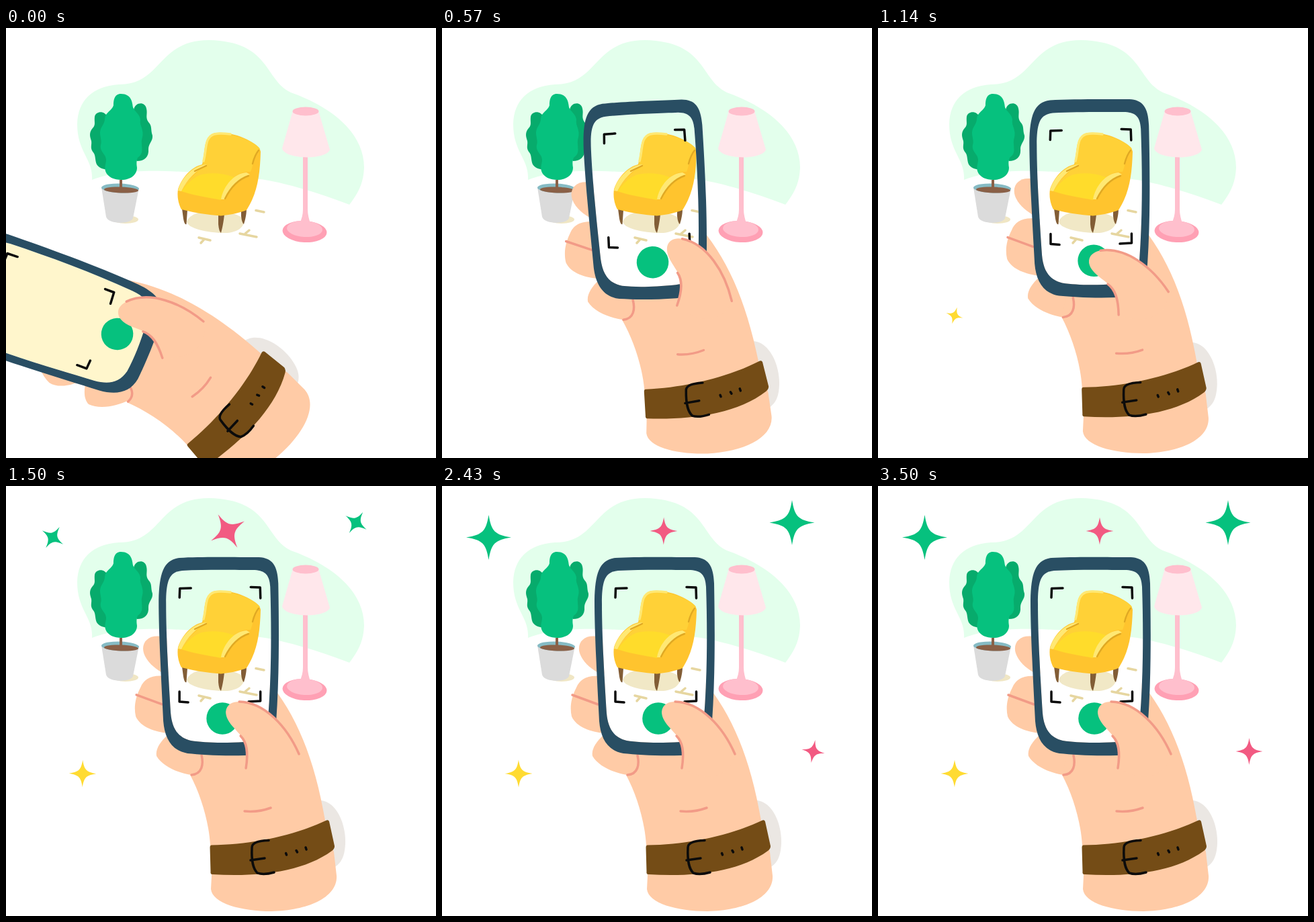
An HTML page that plays this animation: 640x640 px, repeating every 3.57 s.

```html
<!DOCTYPE html>
<html lang="en">
<head>
<meta charset="utf-8">
<title>Phone camera</title>
<style>
  html, body { margin: 0; width: 100%; height: 100%; overflow: hidden; background: #fff; }
  svg { display: block; width: 100vw; height: 100vh; }
  .line { fill: none; stroke-linecap: round; stroke-linejoin: round; stroke-width: 3.5; }
  .crease { stroke: #f29b87; }
  .ink { stroke: #0b0b0b; }
  .mark { stroke: #e6d6a0; }
  .fold { stroke: #e0a923; stroke-width: 2.4; }
  .glow { stroke: #ffe873; }
  .skin { fill: #ffcba6; }
  .wood { fill: #825d36; }
  .leaf { fill: #06c17e; }
  .shade { fill: #07ab6c; }
</style>
</head>
<body>
<svg viewBox="0 0 640 640">
  <defs>
    <clipPath id="glass">
      <path id="hole" d="M262 126C300 124 345 125 370 125C386 126 392 133 393 150C395 210 395 280 390 345C388 370 378 380 355 381C320 383 295 382 275 379C255 374 247 360 245 338C242 290 238 225 238 175C238 140 243 128 262 126Z"/>
    </clipPath>
    <path id="spark" d="M0-1C.12-.27 .27-.12 1 0C.27 .12 .12 .27 0 1C-.12 .27-.27 .12-1 0C-.27-.12-.12-.27 0-1Z"/>
  </defs>

  <path id="wall" fill="#e3ffec" d="M128 226C130 195 106 185 106 143C107 108 128 87 168 84C232 85 225 18 302 18C394 20 384 77 424 96C470 112 533 148 533 208C532 232 524 246 511 263C460 243 405 228 378 225C310 215 240 212 205 213C170 214 145 219 128 226Z"/>

  <g id="plant">
    <ellipse cx="178" cy="285" rx="19" ry="6" fill="#f0e6c4"/>
    <path class="shade" d="M151 133C148 123 134 123 132 132C131 140 134 144 129 149C123 156 125 162 127 168C128 174 125 178 129 184C134 189 132 196 135 203C139 209 146 211 152 210L166 180Z"/>
    <path class="shade" d="M190 122C192 110 207 109 209 120C211 128 207 133 212 140C218 146 215 152 218 160C219 168 212 172 212 180C213 192 206 198 195 198L176 170Z"/>
    <path class="leaf" d="M171 98C161 98 160 108 160 115C158 123 148 125 147 135C147 144 140 147 140 156C140 163 143 168 141 174C139 184 149 188 149 196C149 202 146 206 148 213C151 222 161 226 172 226C186 226 195 218 195 208C194 202 194 198 196 193C205 187 202 180 202 172C201 165 205 161 203 153C202 146 199 144 200 137C200 129 191 124 189 118C188 111 187 98 171 98Z"/>
    <path fill="#dbdbdb" d="M142 237L149 281C152 292 185 293 189 283L198 238Z"/>
    <ellipse cx="170" cy="238.500" rx="28" ry="7" fill="#86bbc4" transform="rotate(2 170 238)"/>
    <ellipse cx="171.500" cy="241" rx="25.500" ry="4.500" fill="#8a6047" transform="rotate(2 171 241)"/>
    <path fill="#8a6047" d="M169 226h4v14h-4z"/>
  </g>

  <g id="lamp">
    <ellipse cx="444.500" cy="303" rx="33" ry="16" fill="#ffa0b4" transform="rotate(3 444 303)"/>
    <ellipse cx="444.500" cy="299" rx="26.500" ry="12" fill="#ffbfcd" transform="rotate(3 444 299)"/>
    <path fill="#ffbfcd" d="M442 185h7V270C449 278 451 284 453 291H437C440 284 442 278 442 270Z"/>
    <path fill="#ffe7eb" d="M427 123L411 179C414 196 477 197 482 181L465 123Z"/>
    <ellipse cx="446" cy="124" rx="19.500" ry="6.500" fill="#ffbfcd"/>
  </g>

  <g id="chair">
    <path fill="#f1e8c6" d="M269 288C270 298 298 305 326 305C343 305 354 297 354 288C354 272 280 262 269 288Z"/>
    <path class="line mark" d="M372 271.500L384 274M348 306L373 311M356 306L362 301M287 312L304 316M290 320L294.500 315"/>
    <path class="wood" d="M262 269L270 271L268.500 292Q266 294 264 284ZM316 277L325 277C324 288 322 298 320 305Q317 303 316 292ZM350 271L358 269C358 277 356 286 354 292Q351 290 350 280Z"/>
    <path fill="#ffc42e" d="M256 240C254 254 258 264 261 270Q292 278 320 279.500C335 278 348 275 358 271C374 246 378 220 379 184C378 172 338 152 310 156.500C293 162 297 185 292 203C276 207 262 222 256 240Z"/>
    <path fill="#ffd137" d="M293 203C298 180 294 163 312 157.500C340 155 375 172 378 180C366 192 369 204 364 214C346 213 335 224 330 236L282 218Z"/>
    <path fill="#ffdc2b" d="M261 243C273 226 285 217 298 217C312 215 330 218 341 223C328 234 322 245 320 256C300 252 278 249 261 243Z"/>
    <path fill="#ffd137" d="M261 242C272 222 285 215 298 204L299 216C284 217 272 229 261 242Z"/>
    <path class="line glow" d="M294 198C299 180 295 163 310 158C318 156 326 157 334 158"/>
    <path fill="#ffe873" d="M256 242C261 222 280 204 299 203C284 212 270 224 261 243ZM320 255C324 234 340 216 358 215L363 218C347 223 334 238 326 255Z"/>
    <path class="line fold" d="M281 213L298 205M326 254C334 238 346 225 361 220M367 202C369 194 372 187 376 182"/>
  </g>

  <g id="fingers">
    <path class="skin" d="M255 229L230 224C212 221 200 233 205 249C210 263 222 272 234 279L260 280Z"/>
    <path class="skin" d="M260 285L236 283C215 281 205 288 200 300C192 315 190 330 193 343C200 359 222 366 241 368L265 362Z"/>
    <path class="skin" d="M290 375L241 370C229 381 222 392 224 402C234 419 260 428 276 430L300 425Z"/>
    <path class="line crease" d="M194 311L232 325"/>
  </g>

  <g id="arm">
    <path fill="#ebe7e3" d="M463 468C489 465 506 500 505 532C504 553 498 562 488 568Z"/>
    <path class="skin" d="M285 380L340 300L389 289C432 340 459 405 475 498L488 545L492 580C494 612 450 632 395 633C350 633 307 621 305 600L306 580L304 535C302 500 290 460 274 430Z"/>
    <path class="line crease" d="M291 401C294 414 292 429 276 430M355 484Q375 486 394 479"/>
    <path fill="#744c16" d="M306 534.500C365 534 430 520 477 497.500Q480 496.500 481 499.500L489 536Q489 540 485 543C440 576 370 582 307 578Q304 578 304.500 574L303.500 538Q303.500 534.500 306 534.500Z"/>
    <path class="line ink" d="M391 527.500C375 528 366 531 366 538C365 560 368 570 374 576C382 579 392 577 399 575M364 557L385 554"/>
    <path class="line ink" d="M416.500 546.500L417.500 549M432 542.500L433.500 545M446 538L447 541"/>
  </g>

  <g clip-path="url(#glass)">
    <path fill="#fff" d="M0 0H640V640H0Z"/>
    <use href="#wall"/>
    <use href="#chair"/>
    <path id="tint" fill="#fff6cc" d="M-400 0H640V640H-400Z"/>
  </g>

  <g id="phone">
    <path fill="#294e63" fill-rule="evenodd" d="M258 107C290 105 345 106 376 106C396 107 404 118 405 145C406 200 407 280 402 350C399 386 385 400 355 401C320 402 290 400 270 398C246 394 236 375 234 350C231 290 227 220 227 170C228 130 234 110 258 107ZM262 126C243 128 238 140 238 175C238 225 242 290 245 338C247 360 255 374 275 379C295 382 320 383 355 381C378 380 388 370 390 345C395 280 395 210 393 150C392 133 386 126 370 125C345 125 300 124 262 126Z"/>
    <path class="line ink" d="M258 166L258.500 152.500L275 152M364 150.500L378 151L378.500 167M258 306V321L271 322M361 321L378.500 320V306"/>
    <circle class="leaf" cx="322" cy="346" r="23.800"/>
  </g>

  <g id="thumb">
    <path class="skin" d="M347 321C385 322 418 358 436 399C430 432 396 444 357 420C361 396 358 381 349 371C340 360 327 350 327 336C328 325 337 321 347 321Z"/>
    <path class="line crease" d="M347 321C385 322 418 358 436 399M349 372C358 381 361 395 357 420"/>
  </g>

  <g id="stars"></g>
</svg>

<script>
const LOOP = 3570;
const $ = id => document.getElementById(id);

// x, y, radius, colour, landing time, spin per unit of scale
const stars = [
  [114, 428, 20.5, '#ffdb32', 1215, 45],
  [330, 67, 20.5, '#f25a82', 1350, 75],
  [69.5, 76.5, 33.5, '#06c17e', 1590, 75],
  [521, 54.5, 33.5, '#06c17e', 1590, 75],
  [552.5, 395, 20, '#f25a82', 2000, 75]
].map(([x, y, r, fill, land, spin]) => {
  const el = document.createElementNS('http://www.w3.org/2000/svg', 'use');
  el.setAttribute('href', '#spark');
  el.setAttribute('fill', fill);
  $('stars').append(el);
  return { el, x, y, r, land, spin };
});

const clamp = v => Math.min(1, Math.max(0, v));
const ease = (t, from, to) => {
  const u = clamp((t - from) / (to - from));
  return u * u * (3 - 2 * u);
};
// 0 to 1 with chosen start and end slopes
const hermite = (u, a, b) =>
  u * (1 - u) * (1 - u) * a + u * u * (3 - 2 * u) - u * u * (1 - u) * b;
// damped swing after landing, t in ms
const ring = t => Math.exp(-0.004 * t) * Math.sin(0.0112 * t);
const turn = (deg, x, y) => `rotate(${deg.toFixed(3)} ${x} ${y})`;

const LAND = 160;
const swing = (t, start, amp, endSlope) => t < LAND
  ? start * (1 - hermite(t / LAND, 1, endSlope))
  : amp * ring(t - LAND);

const RISE = 200;
function starScale(t, land) {
  if (t < land) return clamp((t - land + RISE) / RISE);
  return 1 + 0.74 * ring(t - land);
}

function draw(t) {
  const arm = turn(swing(t, -39, 9.2, 0.4), 408, 627);
  const tilt = swing(t, -31.2, 4.3, 0.26);
  const phone = arm + turn(tilt, 316, 336);
  const curl = Math.max(0, -tilt) / 6;
  const press = 12 - 21.8 * ease(t, 680, 1080) + 9.8 * ease(t, 1140, 1500);

  $('arm').setAttribute('transform', arm);
  $('fingers').setAttribute('transform', arm + turn(curl, 290, 440));
  $('phone').setAttribute('transform', phone);
  $('hole').setAttribute('transform', phone);
  $('thumb').setAttribute('transform', arm + turn(press, 398, 413));
  $('tint').setAttribute('opacity', 1 - ease(t, 50, 250));

  for (const { el, x, y, r, land, spin } of stars) {
    const s = starScale(t, land);
    el.setAttribute('visibility', s > 0 ? 'visible' : 'hidden');
    el.setAttribute('transform',
      `translate(${x} ${y}) rotate(${spin * (1 - s)}) scale(${r * s})`);
  }
}

const begin = performance.now();
function tick() {
  draw((performance.now() - begin) % LOOP);
  requestAnimationFrame(tick);
}
draw(0);
requestAnimationFrame(tick);
</script>
</body>
</html>
```
